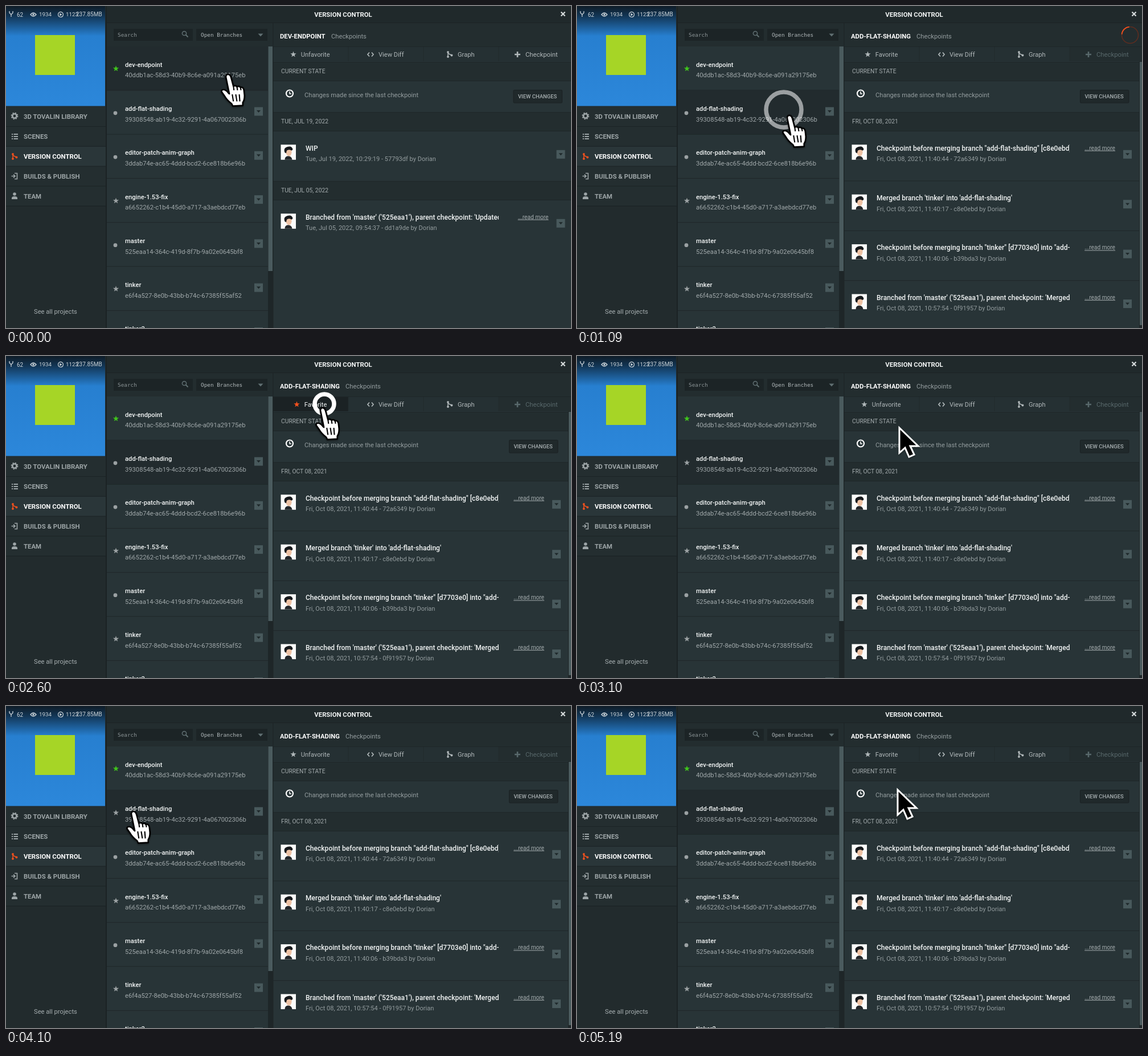
Recreate the animation shown at these times as an HTML page. Size 992x565 px, loop 5.29 s.

```html
<!DOCTYPE html>
<html lang="en">
<head>
<meta charset="utf-8">
<title>Version control</title>
<style>
html, body { margin: 0; width: 100%; height: 100%; overflow: hidden; background: #20292b; }
svg { display: block; width: 100vw; height: 100vh; }
text { font-family: Roboto, sans-serif; white-space: pre; }
text.mono { font-family: "DejaVu Sans Mono", monospace; }
</style>
</head>
<body>
<svg id="stage" viewBox="0 0 992 565"></svg>
<script>
const LOOP = 5290;
const stage = document.getElementById('stage');
const C = {
  dark: '#20292b', head: '#232d2f', panel: '#283437', line: '#1e2628', field: '#1c2426',
  thumb: '#4a5b5e', white: '#f2f5f5', text: '#b1b8ba', dim: '#949d9f', off: '#58686b',
  orange: '#f4511e', green: '#3fc41c'
};
const ROW = 77.3, LIST_TOP = 71, ENTRY = 87.4;

const branches = [
  ['dev-endpoint', '40ddb1ac-58d3-40b9-8c6e-a091a29175eb', true],
  ['add-flat-shading', '39308548-ab19-4c32-9291-4a067002306b', false],
  ['editor-patch-anim-graph', '3ddab74e-ac65-4ddd-bcd2-6ce818b6e96b', false],
  ['engine-1.53-fix', 'a6652262-c1b4-45d0-a717-a3aebdcd77eb', true],
  ['master', '525eaa14-364c-419d-8f7b-9a02e0645bf8', false],
  ['tinker', 'e6f4a527-8e0b-43bb-b74c-67385f55af52', true],
  ['tinker2', '', false]
];
const devEntries = [
  [220, 'WIP', 'Tue, Jul 19, 2022, 10:29:19 - 57793df'],
  [341, "Branched from 'master' ('525eaa1'), parent checkpoint: 'Updated", 'Tue, Jul 05, 2022, 09:54:37 - dd1a9de', true]
];
const flatEntries = [
  ['Checkpoint before merging branch "add-flat-shading" [c8e0ebd]', 'Fri, Oct 08, 2021, 11:40:44 - 72a6349', true],
  ["Merged branch 'tinker' into 'add-flat-shading'", 'Fri, Oct 08, 2021, 11:40:17 - c8e0ebd', false],
  ['Checkpoint before merging branch "tinker" [d7703e0] into "add-flat', 'Fri, Oct 08, 2021, 11:40:06 - b39bda3', true],
  ["Branched from 'master' ('525eaa1'), parent checkpoint: 'Merged", 'Fri, Oct 08, 2021, 10:57:54 - 0f91957', true]
].map((e, i) => [220 + i * ENTRY, ...e]);

// Pointer path: time, x, y of the tip
const path = [
  [100, 392, 122], [500, 363, 182], [700, 363, 182], [1100, 375, 194], [1300, 390, 186],
  [1700, 550, 87], [1900, 559, 84], [2400, 559, 84], [2600, 558, 93], [3100, 566, 126],
  [3200, 566, 126], [3900, 226, 187], [4100, 226, 187], [4400, 558, 86], [4700, 558, 89], [5200, 563, 147]
];
const clicks = [[800, 363, 182], [2400, 559, 84], [4500, 558, 86]];

const rect = (x, y, w, h, fill, more = '') =>
  `<rect x="${x}" y="${y}" width="${w}" height="${h}" fill="${fill}" ${more}/>`;
const circle = (x, y, r, fill, more = '') => `<circle cx="${x}" cy="${y}" r="${r}" fill="${fill}" ${more}/>`;
const shape = (d, fill, x = 0, y = 0, more = '') =>
  `<path d="${d}" fill="${fill}" transform="translate(${x} ${y})" ${more}/>`;
const stroke = (d, color, x, y, width = 1.5) => shape(d, 'none', x, y, `stroke="${color}" stroke-width="${width}"`);
// y is the middle of the capital letters
const label = (x, y, str, size = 11.15, fill = C.dim, weight = 400, more = '') =>
  `<text x="${x}" y="${y + size * 0.356}" font-size="${size}" fill="${fill}" font-weight="${weight}" ${more}>` +
  str.replace(/&/g, '&amp;').replace(/</g, '&lt;') + '</text>';

const star = (x, y, fill) => {
  let d = '';
  for (let i = 0; i < 10; i++) {
    const r = i % 2 ? 2.2 : 5.4, a = i * Math.PI / 5;
    d += (i ? 'L' : 'M') + (r * Math.sin(a)).toFixed(2) + ',' + (-r * Math.cos(a)).toFixed(2);
  }
  return shape(d + 'Z', fill, x, y);
};
const branchIcon = (x, y, color) =>
  stroke('M-3,-3V3M-3,-2L3.5,1.5', color, x, y) +
  circle(x - 3, y - 4, 1.9, color) + circle(x - 3, y + 4, 1.9, color) + circle(x + 3.5, y + 1.5, 1.9, color);
const dropdown = (x, y) => rect(x - 7.5, y - 7.5, 15, 15, '#48595c') + shape('M-3.5,-2H3.5L0,2Z', '#1e282a', x, y);
const avatar = (x, y) =>
  rect(x, y, 26.5, 26.5, '#fbfbfa') +
  shape('M7,26.5Q7,20 13,20Q19,20 20,26.5Z', '#25282b', x, y) +
  shape('M9,9H19V14Q18,20 14.5,20Q11,20 9,15Z', '#efc3a5', x, y) +
  shape('M7,14Q4,6 11,4Q19,1 21,8Q20,11 18,10Q15,8 11,10Q10,11 9.5,15Z', '#17191c', x, y);

function sidebar() {
  const items = ['3D TOVALIN LIBRARY', 'SCENES', 'VERSION CONTROL', 'BUILDS & PUBLISH', 'TEAM'];
  let out = rect(0, 0, 175, 565, '#222b2d') + rect(0, 0, 174, 175.5, 'url(#sky)') + rect(51, 51, 70, 70, '#a6d526');
  const info = '#cbd3d8';
  out += stroke('M-3,-5V-2L0,1L3,-2V-5M0,1V5', info, 9, 14, 1.3) + label(19, 15, '62', 10, info) +
    stroke('M-5,0Q0,-6 5,0Q0,6 -5,0Z', info, 48, 15, 1.4) + circle(48, 15, 1.7, info) + label(58, 15, '1934', 9.8, info) +
    stroke('M4.5,0A4.5,4.5 0 1 1 4.5,-.1', info, 96, 15, 1.2) + shape('M-1.5,-2.5L2.5,0L-1.5,2.5Z', info, 96, 15) +
    label(105, 15, '1123', 9.8, info) + label(123, 14, '237.85MB', 10, info);
  items.forEach((name, i) => {
    const y = 177 + i * 34.9, active = i === 2;
    out += rect(0, y, 175, 34, active ? '#2a3639' : '#242e30') + rect(0, y + 34, 175, 1, '#1b2224') +
      label(31, y + 17, name, 11.4, active ? '#fff' : '#9da5a7', 700);
  });
  const grey = '#9da5a7';
  return out +
    circle(15, 193, 3.7, 'none', `stroke="${grey}" stroke-width="2.6"`) +
    circle(15, 193, 5.5, 'none', `stroke="${grey}" stroke-width="1.8" stroke-dasharray="2.3 2.02"`) +
    stroke('M-5,-4H-3M-1.5,-4H6M-5,0H-3M-1.5,0H6M-5,4H-3M-1.5,4H6', grey, 15, 229, 1.8) +
    branchIcon(15, 264, C.orange) +
    stroke('M0,-5H4.5V5H0M-5.5,0H1M-2,-3L1,0L-2,3', grey, 15, 298.5, 1.6) +
    circle(15, 330, 2.8, grey) + shape('M-5,6V4Q-5,1 0,1Q5,1 5,4V6Z', grey, 15, 333) +
    label(49, 536, 'See all projects', 11.2, '#a6aeb0');
}

function branchList(selected, hovered, favorite) {
  let out = rect(177, 30, 292, 41, C.head) + rect(177, 71, 283, 494, C.panel);
  branches.forEach(([name, id, starred], i) => {
    const y = LIST_TOP + i * ROW;
    if (i === selected || i === hovered) out += rect(177, y, 283, ROW, '#222b2e');
    out += rect(177, y + ROW - 1, 283, 1, C.line) +
      label(209, y + 31.7, name, 11.2, C.white, 500) + label(209, y + 50.5, id, 11.2, '#a0a8aa');
    out += starred || (i === 1 && favorite)
      ? star(193, y + 39, i ? '#9ba1a3' : C.green) : circle(192, y + 39.5, 3.4, '#9ba1a3');
    if (i) out += dropdown(443.5, y + 36.7);
  });
  return out +
    rect(189, 40, 139, 21, C.field) + label(196, 51, 'Search', 9.35, '#8b9496', 400, 'class="mono"') +
    circle(313, 48, 3.6, 'none', 'stroke="#617073" stroke-width="1.5"') + stroke('M0,0L4,4', '#617073', 315.5, 50.5, 1.8) +
    rect(334, 40, 125, 21, C.field) + label(342, 51, 'Open Branches', 9.35, C.text, 400, 'class="mono"') +
    shape('M-4.5,-2.5H4.5L0,2.5Z', '#617073', 447, 51) +
    rect(460, 71, 9, 494, C.line) + rect(460.5, 71, 7.5, 394, C.thumb);
}

function tabs(flat, favorite, hover) {
  let out = rect(469, 72, 523, 25, '#253033');
  if (hover) out += rect(469, 72, 132, 25, '#1b2224');
  if (flat) out += rect(865, 72, 127, 25, '#232d2f');
  out += [601, 733, 865].map(x => rect(x - .5, 72, 1, 25, '#222b2d')).join('');
  const off = flat ? C.off : C.text, starX = favorite ? 504.5 : 510.5;
  return out + star(starX, 85, hover ? C.orange : C.text) +
    label(starX + 13.2, 85, favorite ? 'Unfavorite' : 'Favorite', 11.15, hover ? C.white : C.text) +
    stroke('M-2,-3.5L-5,0L-2,3.5M2,-3.5L5,0L2,3.5', C.text, 640, 85, 1.7) + label(654, 85, 'View Diff', 11.15, C.text) +
    branchIcon(779, 85, C.text) + label(793, 85, 'Graph', 11.15, C.text) +
    stroke('M-5,0H5M0,-5V5', off, 898, 85, 2.6) + label(912, 85, 'Checkpoint', 11.3, off);
}

function sectionHead(y, title) {
  return rect(469, y, 523, 34, C.head) + rect(469, y, 523, 1, C.line) + rect(469, y + 33, 523, 1, C.line) +
    label(483, y + 16.3, title, 10.3, '#a3abad');
}

function entry([y, title, stamp, more], shift) {
  return avatar(482.5, y + 23.3) +
    `<g clip-path="url(#titleClip)">${label(526, y + 29.3, title, 12.05, C.white, 500)}</g>` +
    label(526, y + 48.3, stamp + ' by Dorian', 11.05) +
    (more ? label(952.5 - shift, y + 29, '...read more', 10.15, '#a3abad', 400, 'text-anchor="end" text-decoration="underline"') : '') +
    dropdown(974 - shift, y + 40.3);
}

function checkpoints(flat, favorite, hover) {
  const shift = flat ? 7.5 : 0;
  let out = rect(469, 30, 523, 42, C.head) + rect(469, 97, 523, 468, C.panel) +
    label(481, 53, flat ? 'ADD-FLAT-SHADING' : 'DEV-ENDPOINT', 11.3, '#fff', 700) +
    label(flat ? 596 : 571, 53, 'Checkpoints', 11.2) + rect(469, 71, 523, 1, C.line) +
    tabs(flat, favorite, hover) + sectionHead(98, 'CURRENT STATE') +
    circle(498, 153.5, 6, 'none', 'stroke="#fff" stroke-width="2.2"') + stroke('M0,-3.5V.5H3', '#fff', 498, 153.5, 1.5) +
    label(524, 156, 'Changes made since the last checkpoint') +
    rect(891 - shift, 147.5, 85.5, 22.5, '#20292b', 'rx="1.5" stroke="#1a2123"') +
    label(899 - shift, 159, 'VIEW CHANGES', 9.45, '#a9b1b3', 500) +
    sectionHead(186, flat ? 'FRI, OCT 08, 2021' : 'TUE, JUL 19, 2022');
  if (flat) {
    out += flatEntries.map(e => entry(e, shift) + rect(469, e[0] + ENTRY - 1, 519, 1, C.line)).join('') +
      rect(987, 97, 5, 468, C.line) + rect(988, 98, 4, 462, C.thumb);
  } else {
    out += sectionHead(307, 'TUE, JUL 05, 2022') + devEntries.map(e => entry(e, shift)).join('');
  }
  return out;
}

function spinner(t) {
  const angle = 225 + (t - 1100) * 360 / 860;
  return circle(971, 51, 14.5, 'none', 'stroke="#5e2d20" stroke-width="1.6"') +
    circle(971, 51, 14.5, 'none', `stroke="${C.orange}" stroke-width="1.8" stroke-dasharray="20 100" transform="rotate(${angle - 40} 971 51)"`);
}

function pointerAt(t) {
  if (t <= path[0][0]) return path[0].slice(1);
  const i = path.findIndex(k => k[0] >= t);
  const [t0, x0, y0] = path[i - 1], [t1, x1, y1] = path[i];
  const u = (t - t0) / (t1 - t0), e = u * u * (3 - 2 * u);
  return [x0 + (x1 - x0) * e, y0 + (y1 - y0) * e];
}

function pointer(x, y, hand) {
  if (!hand) {
    return shape('M0,0V44L10,35L17,51L26,47L19,32H33Z', '#000', x, y, 'stroke="#fff" stroke-width="3" filter="url(#shadow)"');
  }
  return `<g transform="translate(${x - 2} ${y - 2}) scale(1.03)" filter="url(#shadow)">` +
    shape('M-4,4Q-3,-1 1,0Q4,1 5,5L9,20Q13,18 15,21Q19,19 21,22Q26,21 27,27L28,36Q28,44 25,48V53L8,54L6,50Q-2,44 -6,37L-11,30Q-12,26 -8,26Q-4,26 0,31L2,33Z',
      '#fff', 0, 0, 'stroke="#000" stroke-width="2.6" stroke-linejoin="round"') +
    stroke('M9,20L10,27M15,21L16,27M21,22L22,27M7,34L9,46M13,34L15,46M19,34L20,46', '#000', 0, 0, 2) + '</g>';
}

function ripple(t) {
  return clicks.map(([start, x, y]) => {
    const age = t - start;
    if (age < 100 || age > 400) return '';
    const alpha = Math.min(1, 1 - (age - 200) * 0.0045);
    return circle(x, y, 3 + (age - 100) * 0.14, 'none', `stroke="#fff" stroke-width="7.5" opacity="${alpha}"`);
  }).join('');
}

function scene(t) {
  const [x, y] = pointerAt(t);
  const flat = t >= 1000, favorite = !flat || (t >= 2900 && t < 4900);
  const overList = x > 177 && x < 460 && y > LIST_TOP, overTabs = x > 469 && y > 72 && y < 97;
  const hovered = overList ? Math.floor((y - LIST_TOP) / ROW) : -1;
  return `<defs>
    <linearGradient id="sky" x2="0" y2="1"><stop stop-color="#0f1c27"/><stop offset=".1" stop-color="#123656"/><stop offset=".3" stop-color="#277fd0"/><stop offset="1" stop-color="#2c87da"/></linearGradient>
    <clipPath id="titleClip"><rect x="520" width="345" height="565"/></clipPath>
    <filter id="shadow" x="-30%" y="-30%" width="160%" height="160%"><feDropShadow dx="0" dy="1.5" stdDeviation="1.5" flood-opacity=".4"/></filter>
    </defs>` + rect(0, 0, 992, 565, C.dark) + sidebar() +
    label(592, 14.5, 'VERSION CONTROL', 11.35, C.white, 600, 'text-anchor="middle"') +
    stroke('M-3.5,-3.5L3.5,3.5M3.5,-3.5L-3.5,3.5', '#d5dadb', 978, 14, 2.2) +
    rect(177, 29, 815, 1, '#1b2224') +
    branchList(flat ? 1 : 0, hovered, flat && favorite) +
    checkpoints(flat, favorite, overTabs && x < 601) +
    rect(468, 30, 1.5, 535, C.line) + rect(175, 0, 2, 565, '#1b2224') +
    (t >= 1000 && t < 2200 ? spinner(t) : '') + ripple(t) + pointer(x, y, overList || overTabs);
}

// The picture advances ten times a second
let shown = -1;
function tick() {
  const t = Math.floor((performance.now() % LOOP + 10) / 100) * 100;
  if (t !== shown) {
    shown = t;
    stage.innerHTML = scene(Math.min(t, 5200));
  }
  requestAnimationFrame(tick);
}
tick();
</script>
</body>
</html>
```
